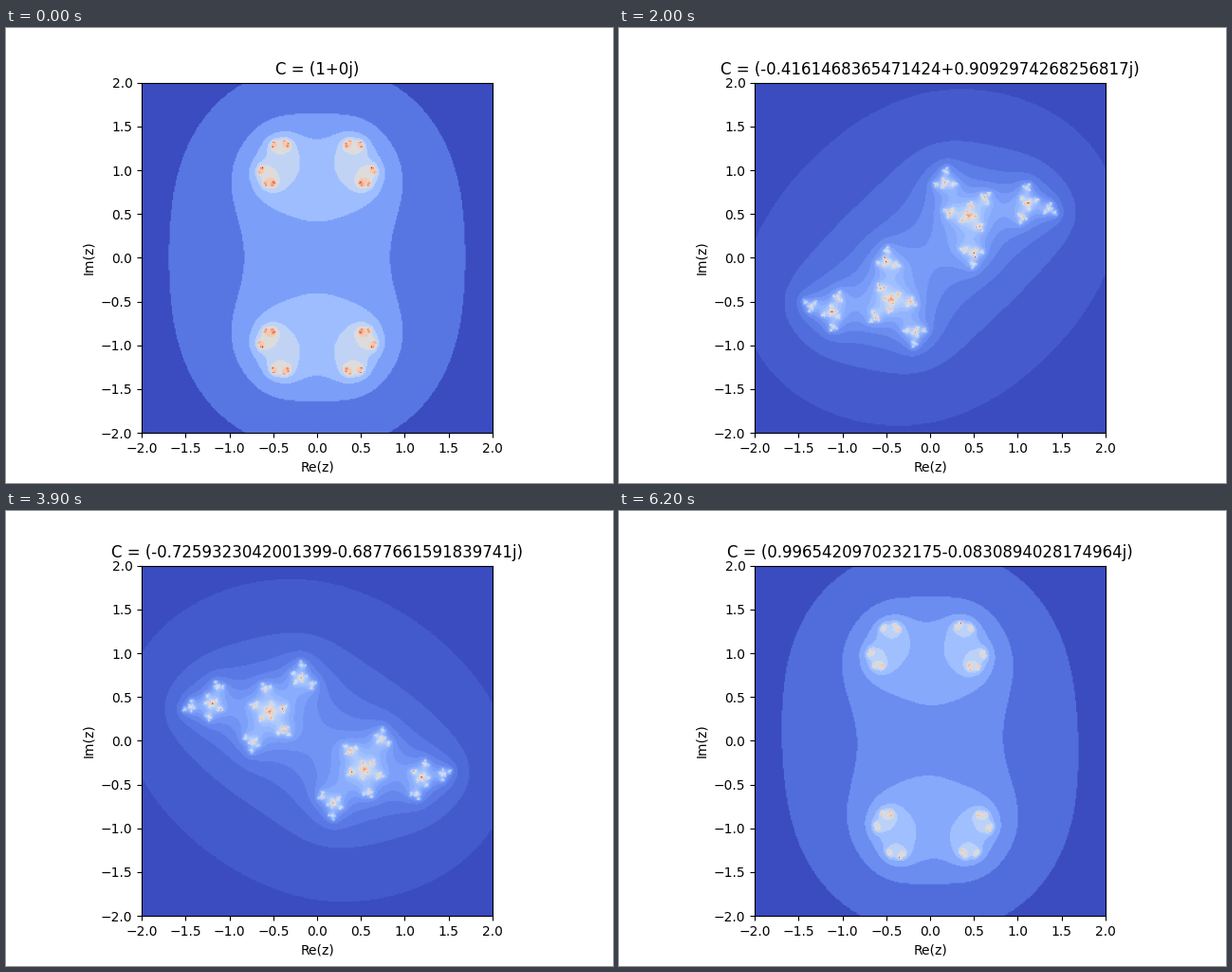
Write a matplotlib script that moves like this. It is 640x480 px and loops after 6.3 s.

```python
import math

import matplotlib.pyplot as plt
import numpy as np
from matplotlib.animation import FuncAnimation

FRAMES = 63
STEP = 0.1        # angle added to C per frame, in radians
SIZE = 300        # samples per axis
MAX_ITER = 200
LIMIT = 2.0

axis = np.linspace(-LIMIT, LIMIT, SIZE)
GRID = (axis[None, :] + 1j * axis[:, None]).ravel()


def parameter(k):
    """Point on the unit circle."""
    t = k * STEP
    return complex(math.cos(t), math.sin(t))


def julia(c):
    """Iteration at which z*z + c overflows; 0 where it stays bounded."""
    counts = np.zeros(GRID.size)
    z = GRID.copy()
    alive = np.arange(GRID.size)
    with np.errstate(all="ignore"):
        for i in range(MAX_ITER):
            z = z * z + c
            finite = np.isfinite(z)
            if not finite.all():
                counts[alive[~finite]] = i
                z, alive = z[finite], alive[finite]
            if not alive.size:
                break
    return counts.reshape(SIZE, SIZE)


fig, ax = plt.subplots(figsize=(6.4, 4.8), dpi=100)
image = ax.imshow(np.zeros((SIZE, SIZE)), cmap="coolwarm",
                  extent=(-LIMIT, LIMIT, -LIMIT, LIMIT))
ticks = np.arange(-LIMIT, LIMIT + 0.1, 0.5)
ax.set_xticks(ticks)
ax.set_yticks(ticks)
ax.set_xlabel("Re(z)")
ax.set_ylabel("Im(z)")
title = ax.set_title("")


def update(k):
    c = parameter(k)
    image.set_data(julia(c))
    image.autoscale()
    title.set_text(f"C = {c}")
    return image, title


anim = FuncAnimation(fig, update, frames=FRAMES, interval=100,
                     repeat=True, repeat_delay=0, blit=False)
plt.show()
```
